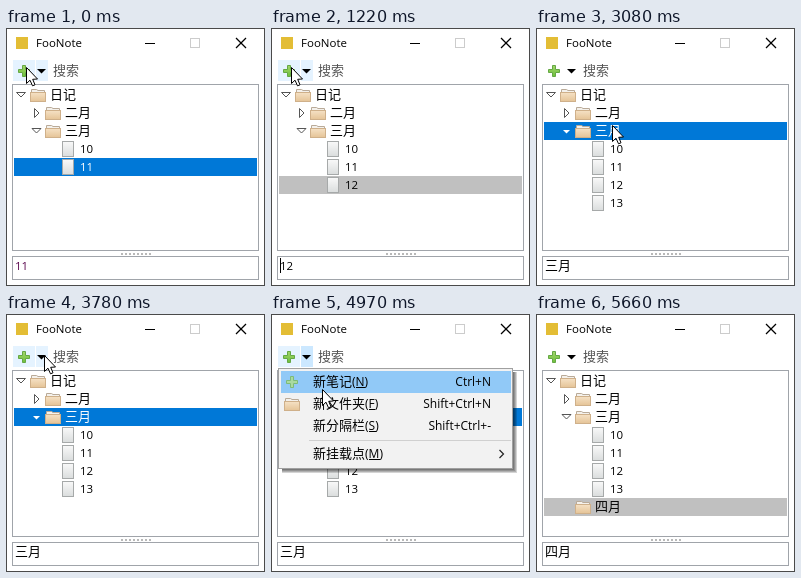
Write an HTML page with a canvas that moves like this. It is 259 by 258 pixels and loops after 8 s.

```html
<!DOCTYPE html>
<html lang="zh">
<head>
<meta charset="utf-8">
<title>FooNote</title>
<style>
  html, body { margin: 0; width: 100%; height: 100%; overflow: hidden; background: #fff; }
  canvas { display: block; width: 259px; height: 258px; }
</style>
</head>
<body>
<canvas id="stage" width="259" height="258"></canvas>
<script>
const ctx = document.getElementById('stage').getContext('2d', { alpha: false });
const LOOP = 8000;
const LATIN = '"Open Sans", "Noto Sans", sans-serif';
const CJK = '"Noto Sans CJK SC", "Noto Sans CJK", sans-serif';
const HOVER = '#e5f3ff', PRESSED = '#cce8ff', BLUE = '#0078d7', GREY = '#c0c0c0';

// Mouse tip: [time, x, y], linear between entries
const MOUSE = [
  [0, 20, 39], [1912, 20, 39], [1990, 33, 53], [2150, 60, 83], [2239, 60, 83],
  [2450, 67, 97], [2620, 67, 97], [2770, 64, 86], [2849, 64, 86], [2850, 76, 91],
  [3079, 76, 91], [3080, 76, 97], [3169, 76, 97], [3780, 38, 41], [4659, 38, 41],
  [4970, 51, 75], [5039, 51, 75], [5130, 55, 82], [LOOP, 55, 82]
];

const MENU = [
  { y: 68, label: '新笔记', key: 'N', shortcut: 'Ctrl+N' },
  { y: 90, label: '新文件夹', key: 'F', shortcut: 'Shift+Ctrl+N' },
  { y: 112, label: '新分隔栏', key: 'S', shortcut: 'Shift+Ctrl+-' },
  { y: 140, label: '新挂载点', key: 'M' }
];

const between = (t, a, b) => t >= a && t < b;

function mouseAt(t) {
  const i = MOUSE.findIndex(k => k[0] > t);
  const [t0, x0, y0] = MOUSE[i - 1], [t1, x1, y1] = MOUSE[i];
  const p = (t - t0) / (t1 - t0);
  return [Math.round(x0 + (x1 - x0) * p), Math.round(y0 + (y1 - y0) * p)];
}

function rect(x, y, w, h, fill) {
  ctx.fillStyle = fill;
  ctx.fillRect(x, y, w, h);
}

function box(x, y, w, h, fill, stroke) {
  rect(x, y, w, h, fill);
  ctx.strokeStyle = stroke;
  ctx.lineWidth = 1;
  ctx.strokeRect(x + .5, y + .5, w - 1, h - 1);
}

function shape(points, fill, stroke, closed = true, lineWidth = 1) {
  ctx.beginPath();
  points.forEach(([x, y]) => ctx.lineTo(x, y));
  if (closed) ctx.closePath();
  if (fill) { ctx.fillStyle = fill; ctx.fill(); }
  if (stroke) { ctx.strokeStyle = stroke; ctx.lineWidth = lineWidth; ctx.stroke(); }
}

function gradient(y0, y1, from, to) {
  const g = ctx.createLinearGradient(0, y0, 0, y1);
  g.addColorStop(0, from);
  g.addColorStop(1, to);
  return g;
}

// Text centred on the line y; returns its width
function text(str, x, y, color = '#000', size = 11.5, align = 'left') {
  const latin = str.charCodeAt(0) < 128;
  ctx.font = latin ? `${size}px ${LATIN}` : `13px ${CJK}`;
  ctx.textAlign = align;
  ctx.fillStyle = color;
  ctx.fillText(str, x, y + 4);
  return ctx.measureText(str).width;
}

function plus(x, y, fill, stroke) {
  const a = 1.5, b = 5.5;
  shape([[-a, -b], [a, -b], [a, -a], [b, -a], [b, a], [a, a], [a, b], [-a, b],
    [-a, a], [-b, a], [-b, -a], [-a, -a]].map(([dx, dy]) => [x + dx, y + dy]), fill, stroke);
}

function folder(x, y) {
  shape([[x + 1.5, y + 5], [x + 1.5, y - 5.5], [x + 6.5, y - 5.5], [x + 8, y - 4.5],
    [x + 14.5, y - 4.5], [x + 14.5, y + 5]], '#f4f1ec', '#b9aa98');
  box(x, y - 3, 16, 10, gradient(y - 3, y + 7, '#f6e3c8', '#e4c294'), '#cfb08a');
}

function page(x, y) {
  box(x, y - 8, 12, 16, gradient(y - 8, y + 8, '#fafafa', '#d9dcdc'), '#a6a9a9');
}

function expander(x, y, open, selected) {
  if (selected) shape([[x - 3.5, y - 1], [x + 3.5, y - 1], [x, y + 2.5]], '#fff');
  else if (open) shape([[x - 4.5, y - 2.5], [x + 4.5, y - 2.5], [x, y + 2]], '#fff', '#555');
  else shape([[x - 2, y - 4.5], [x + 2.5, y], [x - 2, y + 4.5]], '#fff', '#555');
}

function drawWindow() {
  box(0, 0, 259, 258, '#fff', '#4a4a4a');
  rect(10, 9, 12, 12, '#e3bd35');
  text('FooNote', 30, 15);
  rect(139, 15, 10, 1, '#000');
  box(184, 10, 10, 10, '#fff', '#ccc');
  shape([[230, 10], [240, 20]], null, '#000', false, 1.2);
  shape([[240, 10], [230, 20]], null, '#000', false, 1.2);
  box(6, 56, 247, 167, '#fff', '#a0a4aa');
  box(6, 228, 247, 24, '#fff', '#a0a4aa');
  for (let x = 115; x < 144; x += 4) rect(x, 225, 2, 2, '#b8b8b8');
}

function drawToolbar(t, [mx, my]) {
  const menuOpen = between(t, 4100, 5270);
  const hovered = menuOpen || mx < 42 && between(my, 32, 54);
  const pressed = between(t, 70, 220) || between(t, 1300, 1380);
  if (hovered) {
    rect(7, 32, 22, 21, pressed ? PRESSED : HOVER);
    rect(30, 32, 12, 21, menuOpen ? PRESSED : HOVER);
  }
  plus(18, 43, gradient(37, 49, '#a5d66c', '#6cbf3a'), '#64a844');
  shape([[31, 41], [40, 41], [35.5, 45.5]], '#000');
  text('搜索', 47, 43, '#555');
}

function drawTree(t) {
  const rows = [['日记', 0, true], ['二月', 1, false], ['三月', 1, true], ['10', 2], ['11', 2]];
  if (t >= 220) rows.push(['12', 2]);
  if (t >= 1380) rows.push(['13', 2]);
  if (t >= 5430) rows.push(['四月', 1]);

  const onMonth = between(t, 2540, 5430);
  const selected = onMonth ? 2 : rows.length - 1;
  const focused = t < 220 || onMonth;

  rows.forEach(([label, level, open], i) => {
    const y = 67 + 18 * i, active = i === selected;
    if (active) rect(8, y - 9, 243, 18, focused ? BLUE : GREY);
    if (open !== undefined) expander(15 + level * 15.5, y, open, active && focused);
    if (level < 2) folder(24 + 15 * level, y);
    else page(56, y);
    text(label, 44 + 15 * level, y, active && focused ? '#fff' : '#000');
  });
  text(rows[selected][0], 9, 238, t < 220 ? '#5c0a50' : '#000');
}

function drawCaret(t) {
  const shown = [[220, 760], [1220, 1760], [2240, 2540], [5430, 5660]];
  if (shown.some(([a, b]) => between(t, a, b))) rect(9, 230, 1, 15, '#000');
}

function drawMenu(t, my) {
  if (!between(t, 4220, 5270)) return;
  const x0 = 7, y0 = 54, w0 = 235, h0 = 101;
  const right = x0 + w0, bottom = y0 + h0;
  // The shadow appears at full strength while the panel fades in
  for (let i = 4; i > 0; i--) {
    rect(x0 + 4, bottom, w0 - 4 + i, i, 'rgba(0,0,0,.17)');
    rect(right, y0 + 4, i, h0 - 4, 'rgba(0,0,0,.17)');
  }
  ctx.globalAlpha = t < 4270 ? .52 : 1;
  box(x0, y0, w0, h0, '#f2f2f2', '#a0a0a0');
  for (const { y, label, key, shortcut } of MENU) {
    if (between(my, y - 11, y + 11)) rect(10, y - 11, 230, 22, '#91c9f7');
    let x = 42 + text(label, 42, y);
    x += text('(', x, y, '#000', 12);
    const w = text(key, x, y, '#000', 12);
    rect(Math.round(x), y + 5, Math.round(w), 1, '#000');
    text(')', x + w, y, '#000', 12);
    if (shortcut) text(shortcut, 220, y, '#000', 12, 'right');
  }
  plus(21, 68, '#a9dba0', '#7dbb78');
  folder(13, 90);
  rect(38, 126, 202, 1, '#d0d0d0');
  shape([[228.5, 136], [232.5, 140], [228.5, 144]], null, '#222', false, 1.2);
  ctx.globalAlpha = 1;
}

function drawMouse([x, y]) {
  shape([[0, 0], [0, 16], [3.5, 12.7], [6, 18.3], [8.5, 17.3], [6.2, 11.8], [11, 11.5]]
    .map(([dx, dy]) => [x + .5 + dx, y + .5 + dy]), '#fff', '#000');
}

function draw(now) {
  const t = now % LOOP, mouse = mouseAt(t);
  drawWindow();
  drawToolbar(t, mouse);
  drawTree(t);
  drawCaret(t);
  drawMenu(t, mouse[1]);
  if (t < 5660) drawMouse(mouse);
}

const start = performance.now();
function tick() {
  draw(performance.now() - start);
  requestAnimationFrame(tick);
}
tick();
</script>
</body>
</html>
```
